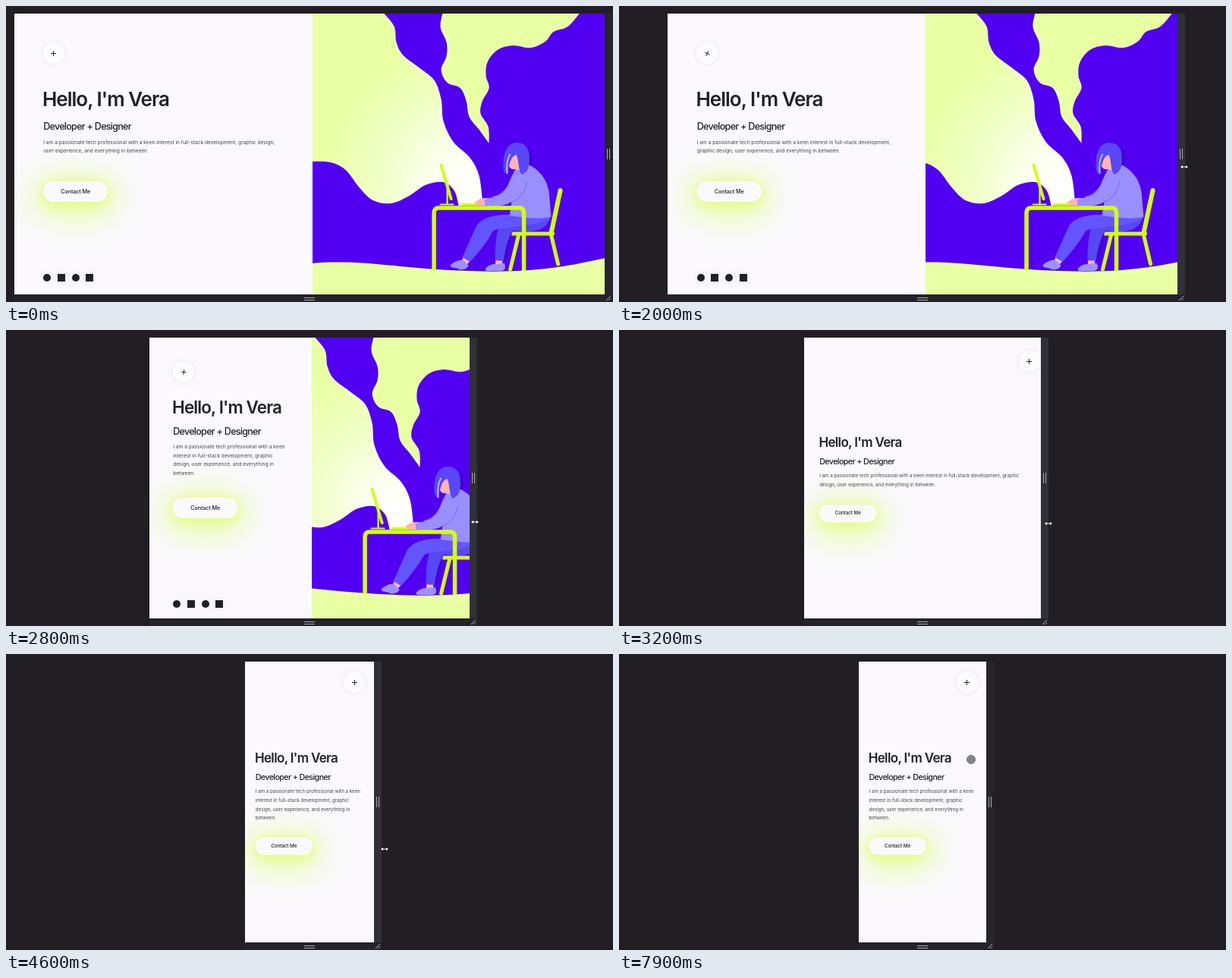
Write an HTML page that moves like this. It is 800x390 px and loops after 8000 ms.

```html
<!DOCTYPE html>
<html lang="en">
<head>
<meta charset="utf-8">
<title>Responsive portfolio</title>
<style>
html, body { margin: 0; width: 100%; height: 100%; overflow: hidden; background: #211f24; }
body { font-family: Inter, "Open Sans", sans-serif; color: #222126; }
#stage { position: relative; width: 800px; height: 390px; overflow: hidden; background: #211f24; }
#stage * { box-sizing: border-box; }
#page { position: absolute; top: 10px; height: 370px; overflow: hidden; background: #fbf9fe; }
#page > * { position: absolute; }

/* layout sizes, largest screen first */
#page {
  --pad: 38.7px; --top: 99.5px; --title: 26px; --sub: 12.5px; --text: 6.6px; --line: 11.5px;
  --gap1: 17.5px; --gap2: 9.6px; --gap3: 33.4px; --bw: 85px; --bh: 27px; --label: 7.3px;
  --icons: 348px; --plusY: 52px;
}
#page.tablet {
  --pad: 31.5px; --top: 80.6px; --title: 22.4px;
  --gap1: 14.5px; --gap2: 9.8px; --gap3: 25.7px; --icons: 351px; --plusY: 45px;
}
#page.mobile, #page.phone {
  --pad: 20px; --top: 186.8px; --title: 17px; --sub: 10.7px; --text: 6.2px; --line: 11.7px;
  --gap1: 10.8px; --gap2: 6.6px; --gap3: 20px; --bw: 75px; --bh: 23.3px; --label: 6.4px;
  --plusY: 31px;
}
#page.phone { --pad: 13.5px; --plusY: 27px; }
.mobile #intro, .phone #intro { transform: translateY(-50%); }
.mobile #scene, .phone #scene, .mobile #icons, .phone #icons { display: none; }

#intro { left: var(--pad); top: var(--top); }
h1, h2, p { margin: 0; }
h1 {
  margin-left: -.05em; white-space: nowrap;
  font-size: var(--title); line-height: var(--title); font-weight: 600; letter-spacing: -.038em;
}
h2 {
  margin-top: var(--gap1); white-space: nowrap;
  font-size: var(--sub); line-height: 12px; font-weight: 500; letter-spacing: -.056em;
}
p { margin-top: var(--gap2); font-size: var(--text); line-height: var(--line); color: #46444b; }
#contact {
  margin-top: var(--gap3); width: var(--bw); height: var(--bh); border-radius: 14px;
  background: #fbf9fe; text-align: center; white-space: nowrap;
  font-size: var(--label); line-height: var(--bh); font-weight: 500; letter-spacing: -.02em;
  box-shadow: 0 3px 16px 1px rgba(214, 255, 70, .62), 0 7px 42px 14px rgba(222, 255, 100, .5);
}
#plus {
  top: var(--plusY); width: 28px; height: 28px; margin: -14px; border-radius: 50%;
  background: #fcfbfe; box-shadow: 0 0 7px rgba(70, 60, 90, .09);
}
#plus i { position: absolute; inset: 0; }
#plus i::before, #plus i::after {
  content: ""; position: absolute; left: 10.5px; top: 13.5px; width: 7px; height: 1px; background: #2b292f;
}
#plus i::after { transform: rotate(90deg); }
#icons { left: var(--pad); top: var(--icons); display: flex; gap: 8.7px; margin-top: -5px; }
#icons b { width: 10px; height: 10px; background: #222126; box-shadow: 0 0 10px rgba(70, 60, 90, .12); }
#icons b:nth-child(odd) { border-radius: 50%; }
#scene { top: 0; height: 370px; }

.bar { position: absolute; background: #26262a; }
#side { top: 10px; width: 10px; height: 370px; }
#side.held { background: #303136; }
#foot { top: 380px; height: 10px; background: #232329; }
.grip { position: absolute; }
#side .grip { left: 3px; top: 178px; width: 4px; height: 14px; border: solid #a9a8ac; border-width: 0 1px; }
#foot .grip { left: 50%; top: 4px; width: 14px; height: 4px; margin-left: -12px; border: solid #a9a8ac; border-width: 1px 0; }
#foot svg { position: absolute; right: 1px; top: 1px; }
#arrow { position: absolute; margin: -4px -5px; }
#touch {
  position: absolute; width: 12px; height: 12px; margin: -6px; border-radius: 50%;
  background: rgba(112, 110, 116, .85); border: 1px solid #77757b;
}
</style>
</head>
<body>
<div id="stage">
  <div id="page">
    <svg id="scene">
      <defs>
        <radialGradient id="light" gradientUnits="userSpaceOnUse" cx="604" cy="236" r="188">
          <stop offset="0" stop-color="#fff"/>
          <stop offset=".2" stop-color="#fcfff0"/>
          <stop offset=".6" stop-color="#f1ffc6"/>
          <stop offset="1" stop-color="#e9ffa4"/>
        </radialGradient>
      </defs>
      <rect x="300" y="0" width="600" height="400" fill="#5100f2"/>
      <path id="beam" fill="url(#light)"/>
      <path id="smoke" fill="#e9ffa4"/>
      <path fill="#e9ffa4" d="M380 342C430 334 470 338 520 343S640 352 690 348S760 338 800 330V400H380Z"/>
      <g fill="none" stroke="#d2ff12" stroke-linecap="round" stroke-linejoin="round">
        <path stroke-width="6" d="M731 243L719 299"/>
        <path stroke-width="5" d="M668 300H721M676 302L665 347M719 302L728 340"/>
      </g>
      <path fill="#3b0bc4" d="M684 186C696 190 697 206 690 216L682 222Z"/>
      <path fill="#ffb4ae" d="M603 331L612 336L607 342L600 338ZM646 333L655 334L654 343L645 342Z"/>
      <path fill="#9c92ff" d="M586 341C594 335 598 334 603 335L610 342C608 347 600 349 596 346L587 344ZM632 346C638 340 643 340 646 340L657 339C660 345 658 349 652 349L633 349Z"/>
      <path fill="#3b0bc4" d="M668 296C664 312 662 324 658 334L654 332L660 294Z"/>
      <path fill="#5648f2" d="M718 274C718 290 704 298 684 297L668 296C660 310 658 325 656 336L645 335C645 318 646 298 652 288L690 274Z"/>
      <path fill="#6355ff" d="M717 275L654 275C632 277 622 284 618 295L602 331L612 337C624 324 634 312 642 297C652 289 690 294 717 280Z"/>
      <path fill="#ffb4ae" d="M618 259C624 253 632 252 640 254L642 263L622 263Z"/>
      <path fill="#9a8fff" d="M682 207C700 211 713 226 716 245L719 278C700 282 680 278 664 276L667 258C656 265 641 264 632 263L631 255C645 252 655 248 662 236C668 222 672 210 682 207Z"/>
      <path fill="none" stroke="#7767ee" d="M667 258C678 254 684 246 687 232M642 251C650 250 654 247 658 243"/>
      <path fill="#ffb4ae" d="M661 196C660 207 664 217 671 215L680 217L682 195Z"/>
      <path fill="#5a47f7" d="M672 180C684 179 691 188 690 200C691 212 688 219 680 222C675 216 677 205 673 196C666 198 664 206 662 221C657 222 655 215 656 208C656 194 660 182 672 180Z"/>
      <path fill="none" stroke="#c9d0ff" stroke-width="1.6" d="M665 195C660 202 660 212 661 221"/>
      <g fill="none" stroke="#d2ff12" stroke-linecap="round" stroke-linejoin="round">
        <path stroke-width="5.5" stroke-linecap="butt" d="M564.5 348V273Q564.5 266 571 266H677Q683 266 683 273V349"/>
        <path stroke-width="4" d="M574 210L587 254"/>
        <path stroke-width="2.2" d="M582 236L582 261M573 261.5H590"/>
        <path stroke-width="3" d="M601 261.5H621"/>
      </g>
    </svg>
    <div id="intro">
      <h1>Hello, I'm Vera</h1>
      <h2>Developer + Designer</h2>
      <p>I am a passionate tech professional with a keen interest in full-stack development, graphic design, user experience, and everything in between.</p>
      <div id="contact">Contact Me</div>
    </div>
    <div id="plus"><i></i></div>
    <div id="icons"><b></b><b></b><b></b><b></b></div>
  </div>
  <div id="side" class="bar"><div class="grip"></div></div>
  <div id="foot" class="bar">
    <div class="grip"></div>
    <svg width="8" height="8" stroke="#bbbabf"><path d="M1 7L7 1M4.500 7L7 4.500"/></svg>
  </div>
  <svg id="arrow" width="10" height="8"><path fill="#fff" d="M0 4L3 2V3.500H7V2L10 4L7 6V4.500H3V6Z"/></svg>
  <div id="touch"></div>
</div>
<script>
const LOOP = 8000, STEP = 100;
const $ = id => document.getElementById(id);
const page = $('page'), scene = $('scene'), side = $('side'), foot = $('foot');
const plus = $('plus'), arrow = $('arrow'), touch = $('touch');
const spinner = plus.firstElementChild, text = document.querySelector('p');

// Keys are [time, value...]; returns the values at time t.
function track(keys, t) {
  const i = keys.findIndex(k => k[0] > t);
  if (i === 0) return keys[0].slice(1);
  if (i < 0) return keys[keys.length - 1].slice(1);
  const a = keys[i - 1], b = keys[i], p = (t - a[0]) / (b[0] - a[0]);
  return a.slice(1).map((v, n) => v + (b[n + 1] - v) * p);
}

// Smooth path through points.
function curve(pts) {
  let d = `M${pts[0]}`;
  for (let i = 0; i < pts.length - 1; i++) {
    const a = pts[i - 1] || pts[i], b = pts[i], c = pts[i + 1], e = pts[i + 2] || c;
    const near = (p, q, r, s) => [0, 1].map(n => p[n] + s * (r[n] - q[n]) / 6);
    d += `C${near(b, a, c, 1)} ${near(c, b, e, -1)} ${c}`;
  }
  return d;
}

const beamTop = [[498, 9], [512, 27], [515, 48], [524, 65], [546, 82], [565, 98], [574, 123],
  [577, 152], [590, 179], [612, 200], [624, 224], [629, 263]];
const beamLow = [[597, 263], [591, 243], [576, 232], [553, 236], [532, 250], [508, 260], [484, 256],
  [466, 239], [448, 216], [428, 206], [403, 205], [380, 208]];
$('beam').setAttribute('d', curve(beamTop) + curve(beamLow).replace('M', 'L') + 'V9Z');

const smokeLeft = [[576, 9], [573, 28], [581, 48], [581, 66], [574, 84], [582, 101], [599, 108],
  [607, 125], [611, 146], [624, 163], [637, 181]];
const smokeRight = [[637, 181], [636, 159], [626, 142], [628, 126], [637, 108], [633, 92], [635, 74],
  [648, 58], [668, 52], [692, 55], [711, 47], [722, 34], [741, 27], [757, 9]];
$('smoke').setAttribute('d', curve(smokeLeft) + curve(smokeRight).replace('M', 'L') + 'Z');

const leftKeys = [[700, 10.5], [1100, 14.5], [1600, 35], [2000, 64], [2500, 151], [2800, 188.7],
  [3400, 272], [3800, 302], [4300, 313], [4700, 316]];
const arrowKeys = [[800, 13, 195], [1100, 13, 195], [2000, 9, 212], [2800, 7, 253], [3800, 14, 257], [4800, 14, 257]];
const touchKeys = [[5200, 478, 180], [5700, 462, 60], [5800, 462, 53], [6000, 463, 46], [6400, 460, 40],
  [7000, 463, 44], [7200, 462, 42], [7900, 464, 139]];
const spinKeys = [[1500, 0], [2000, 27], [2800, 9], [3200, 0], [6000, 0], [6700, 90], [7200, 90], [7800, 0]];

function place(el, x, w) {
  el.style.left = x + 'px';
  if (w !== undefined) el.style.width = w + 'px';
}

function draw(t) {
  const [left] = track(leftKeys, t);
  const right = 800 - left - (t < 800 ? 0.5 : 0), width = right - left;
  const mode = width > 495 ? 'desktop' : width > 410 ? 'tablet' : width > 180 ? 'mobile' : 'phone';
  const split = mode === 'desktop' || mode === 'tablet';
  const pad = { desktop: 38.7, tablet: 31.5, mobile: 20, phone: 13.5 }[mode];
  const column = split ? width * 0.506 : width;

  page.className = mode;
  place(page, left, width);
  place(side, right, 10);
  place(foot, left, width + 10);
  side.classList.toggle('held', t >= 800 && t < 4900);
  text.style.width = column - 2 * pad + 2 + 'px';

  const shift = 0.517 * (right - 789);
  place(scene, column, width - column);
  scene.setAttribute('viewBox', `${left + column - shift} 10 ${width - column} 370`);
  scene.setAttribute('preserveAspectRatio', 'none');

  place(plus, { desktop: 52, tablet: 45, mobile: width - 15, phone: width - 25.5 }[mode]);
  spinner.style.transform = `rotate(${track(spinKeys, t)[0]}deg)`;

  const [ax, ay] = track(arrowKeys, t);
  arrow.style.display = t >= 800 && t < 4900 ? '' : 'none';
  place(arrow, right + ax);
  arrow.style.top = ay + 'px';

  const [tx, ty] = track(touchKeys, t);
  touch.style.display = t >= 5200 ? '' : 'none';
  place(touch, tx);
  touch.style.top = ty + 'px';
}

const start = performance.now();
function tick() {
  const t = (performance.now() - start) % LOOP;
  draw(Math.floor(t / STEP) * STEP);
  requestAnimationFrame(tick);
}
tick();
</script>
</body>
</html>
```
